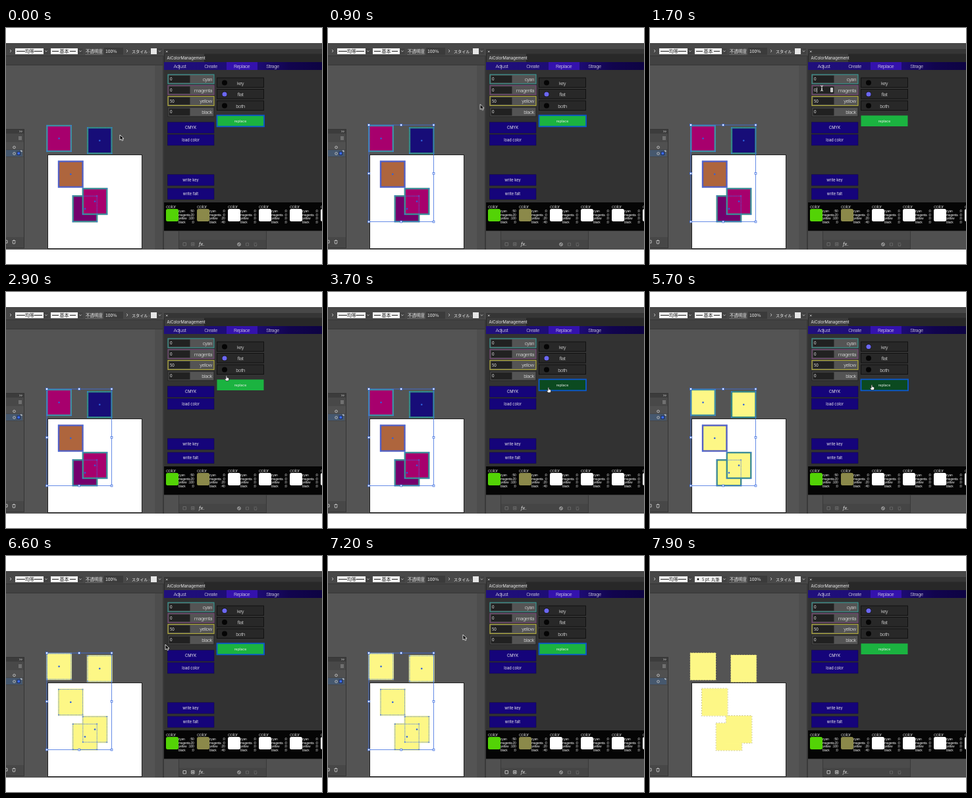
An HTML page for the animation above (8000 ms loop, 480 by 360 pixels).

```html
<!DOCTYPE html>
<html lang="en">
<head>
<meta charset="utf-8">
<title>Colour panel</title>
<style>
html, body { margin: 0; width: 100%; height: 100%; overflow: hidden; background: #fff; }
svg { display: block; width: 480px; height: 360px; }
text { font-family: Roboto, "Liberation Sans", sans-serif; fill: #f0f0f0; }
.jp { font: 7px "Noto Sans CJK JP", "Noto Sans CJK", sans-serif; }
.label { font-size: 7.9px; font-weight: 300; letter-spacing: -.5px; }
.small { font: 5.7px Inter, sans-serif; }
.tiny { font: 4.9px "Liberation Sans", sans-serif; letter-spacing: -.2px; }
.mid { text-anchor: middle; }
.end { text-anchor: end; }
.line { fill: none; stroke: #c8c8c8; stroke-width: .9; }

.anim, .sq { animation: 8s step-end infinite; }
.sq { fill: var(--f); stroke: var(--s); stroke-width: 2.4; animation-name: refill, restroke; }
.path { fill: none; stroke: #4377e8; stroke-width: .8; stroke-dasharray: 1.6 .8; }
.edge { fill: none; stroke: #a9a46d; stroke-width: .8; stroke-dasharray: 2 2; }
.box { fill: none; stroke: #3f6fe0; stroke-width: .8; }
.handle { fill: #fff; stroke: #3f6fe0; stroke-width: .8; }
.selected { animation-name: selected; }
.bounds { animation-name: bounds; }
.deselected { animation-name: deselected; }
.ring { animation-name: ring; }
.go { fill: #1bb340; animation-name: press; }
.key { fill: #6c68f2; animation-name: late; }
.flat { fill: #6c68f2; animation-name: early; }
.caret { animation-name: caret; }
.lit { animation-name: lit; }
.arrow { animation-name: arrow; }
.beam { animation-name: beam; }
.hand { animation-name: hand; }
#pointer { animation: move 8s ease-in-out infinite; }

@keyframes refill { 48.75%, 100% { fill: #fdf786; } }
@keyframes restroke { 73.75%, 100% { stroke: #fdf786; } }
@keyframes selected { 0% { opacity: 1; } 91.25%, 100% { opacity: 0; } }
@keyframes deselected { 0% { opacity: 0; } 91.25%, 100% { opacity: 1; } }
@keyframes bounds { 0% { opacity: 0; } 1.25% { opacity: 1; } 91.25%, 100% { opacity: 0; } }
@keyframes ring { 0% { opacity: 1; } 15% { opacity: 0; } 43.75% { opacity: 1; } 56.25% { opacity: 0; } 70% { opacity: 1; } 91.25%, 100% { opacity: 0; } }
@keyframes press { 43.75%, 70% { fill: #0b4a20; } 48.75%, 73.75%, 100% { fill: #1bb340; } }
@keyframes early { 0% { opacity: 1; } 56.25%, 100% { opacity: 0; } }
@keyframes late { 0% { opacity: 0; } 56.25%, 100% { opacity: 1; } }
@keyframes caret { 0% { opacity: 0; } 15% { opacity: 1; } 28%, 100% { opacity: 0; } }
@keyframes lit { 0% { opacity: .3; } 73.75%, 100% { opacity: 1; } }
@keyframes arrow { 0% { opacity: 1; } 15% { opacity: 0; } 28% { opacity: 1; } 32.5% { opacity: 0; } 77.5% { opacity: 1; } 97.5%, 100% { opacity: 0; } }
@keyframes beam { 0% { opacity: 0; } 15% { opacity: 1; } 28%, 100% { opacity: 0; } }
@keyframes hand { 0% { opacity: 0; } 32.5% { opacity: 1; } 77.5%, 100% { opacity: 0; } }
@keyframes move {
  0%, 4% { transform: translate(173px, 163px); }
  16% { transform: translate(259px, 94px); }
  21.25%, 27% { transform: translate(261px, 92px); }
  36.25% { transform: translate(335px, 128px); }
  42%, 50% { transform: translate(335px, 146px); }
  55.5%, 58% { transform: translate(335px, 84px); }
  61.25% { transform: translate(337px, 97px); }
  68%, 75% { transform: translate(337px, 142px); }
  82.5% { transform: translate(242px, 135px); }
  90%, 100% { transform: translate(205px, 120px); }
}
</style>
</head>
<body>
<svg viewBox="0 0 480 360">
  <defs>
    <linearGradient id="nav"><stop offset="0" stop-color="#20107c"/><stop offset=".6" stop-color="#1c0b72"/><stop offset=".8" stop-color="#11044e"/><stop offset="1" stop-color="#0d0342"/></linearGradient>
    <clipPath id="stage"><rect y="23" width="480" height="315"/></clipPath>
  </defs>
  <g id="app" clip-path="url(#stage)"></g>
  <g id="pointer">
    <path class="anim arrow" d="M0 0V8L2 6.3 3.3 9 4.8 8.3 3.6 5.8H6Z" fill="#000" stroke="#fff" stroke-width=".8"/>
    <path class="anim beam" d="M-2-4Q0-4 0-2.5Q0-4 2-4M0-2.5V3M-2 4Q0 4 0 2.5Q0 4 2 4M-1 1H1" fill="none" stroke="#fff" stroke-width=".9"/>
    <path class="anim hand" d="M-.9 0Q0-.8.7 0V2.6L3.6 3.2V5.5L2.8 7.5H-.9L-2.8 4.6-2 3.9-.9 4.7Z" fill="#fff" stroke="#111" stroke-width=".6"/>
  </g>
</svg>
<script>
const out = [];
const add = s => out.push(s);
const rect = (x, y, w, h, fill, extra = '') =>
  add(`<rect x="${x}" y="${y}" width="${w}" height="${h}" fill="${fill}" ${extra}/>`);
const shape = (cls, x, y, w, h, extra = '') =>
  add(`<rect class="${cls}" x="${x}" y="${y}" width="${w}" height="${h}" ${extra}/>`);
const text = (cls, x, y, s, extra = '') =>
  add(`<text class="${cls}" x="${x}" y="${y}" ${extra}>${s}</text>`);
const path = (d, extra = '') => add(`<path class="line" d="${d}" ${extra}/>`);
const circle = (x, y, r, attrs) => add(`<circle cx="${x}" cy="${y}" r="${r}" ${attrs}/>`);
const group = (cls, draw) => { add(`<g class="${cls}">`); draw(); add('</g>'); };
const chevron = x => { rect(x - 3.5, 31, 7, 9, '#414141'); path(`M${x - 1.7} 34.5l1.7 1.7 1.7-1.7`); };

function toolbar() {
  rect(0, 23, 480, 315, '#545454');
  rect(0, 23, 480, 19, '#484848');
  rect(0, 42, 240, 14, '#424242');
  rect(0, 42, 240, 1, '#353535');
  rect(0, 56, 240, 1, '#363636');
  rect(226, 57, 12, 281, '#4d4d4d');
  rect(238, 42, 2, 296, '#3a3a3a');
  path('M6 33l2 2-2 2');
  rect(14, 31, 43, 9, '#f2f2f2');
  rect(16, 35, 5, 1, '#222');
  rect(21, 35, 34, 1, '#222');
  rect(29, 32, 14, 7, '#f2f2f2');
  text('jp mid', 36, 38, '均等', 'style="fill:#222"');
  chevron(61);
  rect(68, 31, 41, 9, '#f2f2f2');
  group('anim selected', () => {
    rect(70, 35, 36, 1, '#222');
    rect(80, 32, 17, 7, '#f2f2f2');
    text('jp mid', 88.5, 38, '基本', 'style="fill:#222"');
  });
  group('anim deselected', () => {
    circle(73, 35.5, 1.4, 'fill="#111"');
    text('jp', 79, 38, '5 pt. 丸筆', 'style="fill:#222;font-size:6.2px"');
  });
  chevron(113);
  text('jp', 121, 38, '不透明度 :', 'style="font-size:6.5px"');
  path('M121 40.5h25', 'stroke-dasharray="1 1" opacity=".6"');
  rect(149, 30, 29, 11, '#3b3b3b');
  text('jp', 151, 38, '100%', 'style="font-size:6.8px"');
  path('M183 33l2 2-2 2');
  text('jp', 191, 38, 'スタイル :', 'style="font-size:6.1px"');
  rect(220, 31, 9, 9, '#e6e6e6');
  chevron(233.5);
}

function layers() {
  rect(0, 154, 28, 182, '#353535');
  rect(0, 155, 27, 6, '#3c3c3c');
  rect(0, 161, 27, 13, '#484848');
  rect(0, 174, 27, 145, '#505050');
  rect(0, 186, 25, 10, '#46586e');
  rect(0, 185.5, 27, .6, '#404040');
  rect(0, 196, 27, .6, '#404040');
  rect(0, 319, 27, 16, '#474747');
  path('M20.5 156.5l1.3 1.3-1.3 1.3M23 156.5l1.3 1.3-1.3 1.3', 'stroke-width=".6"');
  path('M19 166h5M19 168h5M19 170h5', 'opacity=".7"');
  for (const y of [182, 191.5]) circle(12.5, y, 1.8, 'class="line"');
  path('M22 187h2v2Z');
  group('anim selected', () => rect(17, 189, 4.5, 4.5, '#3b6df0', 'stroke="#1c2a58"'));
  path('M0 324h2v4H0M9.5 324.5h5M10 325.5l.5 3.5h3l.5-3.5M11.3 323.5h1.5');
}

const squares = [
  [62.3, 149, '#a7006d', '#3f968c'],
  [124, 152.2, '#170d78', '#308c66'],
  [80, 203.5, '#ae653d', '#5a57b4'],
  [101.7, 256.3, '#74006d', '#419277'],
  [116.8, 245, '#a7006d', '#3d957b'],
];
const W = 36.5, H = 39;

function artwork() {
  rect(63.5, 193.5, 143, 143, '#fff', 'stroke="#222"');
  group('anim deselected', () => squares.forEach(([x, y]) => shape('edge', x - 1.5, y - 1.5, W + 3, H + 3)));
  for (const [x, y, f, s] of squares) shape('sq', x, y, W, H, `style="--f:${f};--s:${s}"`);
  group('anim selected', () => squares.forEach(([x, y]) => {
    shape('path', x, y, W, H);
    for (const [i, j] of [[0, 0], [1, 0], [0, 1], [1, 1]])
      rect(x + i * W - .8, y + j * H - .8, 1.6, 1.6, '#3f72ea');
    circle(x + W / 2, y + H / 2, 1.3, 'fill="#2f62dc"');
  }));
  group('anim bounds', () => {
    shape('box', 62, 148, 98.5, 147.5);
    for (const x of [62, 111.2, 160.5])
      for (const y of [148, 221.8, 295.5])
        if (x !== 111.2 || y !== 221.8) shape('handle', x - 1.4, y - 1.4, 2.8, 2.8);
  });
}

function field(name, value, y, color) {
  rect(246, y, 70, 14, '#545454', `stroke="${color}"`);
  rect(247.5, y + 1.5, 32, 11, '#212121');
  text('small', 249, y + 9.2, value);
  text('label end', 313, y + 9.8, name);
}

function button(label, y) {
  rect(245.5, y, 70.5, 16.5, '#15047a', 'stroke="#0f0450" stroke-width=".6"');
  text('small mid', 280.5, y + 10.3, label);
}

function swatch(x, color, values) {
  text('label', x, 275, 'color');
  rect(x, 276, 19, 19, color, 'rx="2.5"');
  ['cyan', 'magenta', 'yellow', 'black'].forEach((name, i) => {
    const y = 281 + i * 5.6;
    text('tiny', x + 19, y, name);
    text('tiny end', x + 42.5, y, ':' + values[i]);
  });
}

function panel() {
  rect(240, 32, 240, 278, '#323232');
  rect(240, 32, 240, 8, '#353535');
  rect(240, 39.5, 240, 12.5, '#282828');
  rect(241, 39.5, 60, 12.5, '#3c3c3c');
  path('M243 34.7l2.5 2.5M245.5 34.7l-2.5 2.5', 'stroke-width=".6"');
  text('small', 244.5, 47.5, 'AiColorManagement', 'style="font-size:6px"');
  rect(240, 52, 240, 12, 'url(#nav)');
  rect(335, 52, 47, 12, '#3412ad');
  [['Adjust', 264], ['Create', 311], ['Replace', 358], ['Strage', 405]]
    .forEach(([s, x]) => text('label mid', x, 61, s));

  field('cyan', 0, 71, '#37a39d');
  field('magenta', 0, 87.7, '#7d477d');
  field('yellow', 50, 104.3, '#c5bd38');
  field('black', 0, 121, '#242424');
  group('anim caret', () => {
    rect(253.3, 91, .7, 7.5, '#fff');
    rect(274, 91, 4, 7, '#ddd', 'rx="1"');
    path('M275 93.6l1-1 1 1M275 95.4l1 1 1-1', 'style="stroke:#333;stroke-width:.6"');
  });

  [['key', 76], ['flat', 93.5], ['both', 111]].forEach(([s, y]) => {
    rect(320.5, y, 71, 14.5, '#282828', 'stroke="#111"');
    circle(332, y + 7.5, 4, 'fill="#050505"');
    if (s !== 'both') circle(332, y + 7.5, 3.6, `class="anim ${s}"`);
    text('label mid', 356, y + 10.7, s);
  });
  shape('anim go', 320.5, 133.5, 71, 16.5);
  group('anim ring', () => rect(320.5, 133.3, 71.5, 17, 'none', 'stroke="#0b59cf" stroke-width="1.8"'));
  text('small mid', 356, 143.8, 'replace', 'style="font-size:5.3px"');

  button('CMYK', 143.8);
  button('load color', 162.5);
  button('write key', 223.7);
  button('write falt', 244.8);

  rect(240, 266, 240, 43, '#050505');
  const colors = [['#53d306', [50, 20, 100, 0]], ['#8b894a', [0, 0, 20, 40]]];
  for (let i = 0; i < 6; i++) {
    const [color, values] = colors[i] || ['#fff', [0, 0, 0, 0]];
    swatch(243 + i * 47, color, values);
  }
}

function footer() {
  rect(240, 310, 240, 28, '#505050');
  rect(262, 310, 134, 27, '#393939');
  rect(263, 310, 132, 13, '#4b4b4b');
  rect(263, 323, 132, 13, '#454545');
  group('anim lit', () => {
    path('M269 327.5h4.5v4.5h-4.5Z');
    path('M281.5 327.5h4.5v4.5h-4.5Z');
    rect(282.8, 328.8, 2, 2, '#ccc');
  });
  text('small', 293, 332, 'fx.', 'style="font-style:italic;font-size:7px"');
  group('anim selected', () => {
    circle(354, 330, 2.3, 'class="line"');
    path('M352.4 328.4l3.2 3.2');
  });
  path('M364.5 328h4v4h-4ZM376.5 328h4.5M377 329l.5 3.5h3l.5-3.5', 'opacity=".25"');
}

[toolbar, layers, artwork, footer, panel].forEach(draw => draw());
document.getElementById('app').innerHTML = out.join('');
</script>
</body>
</html>
```
